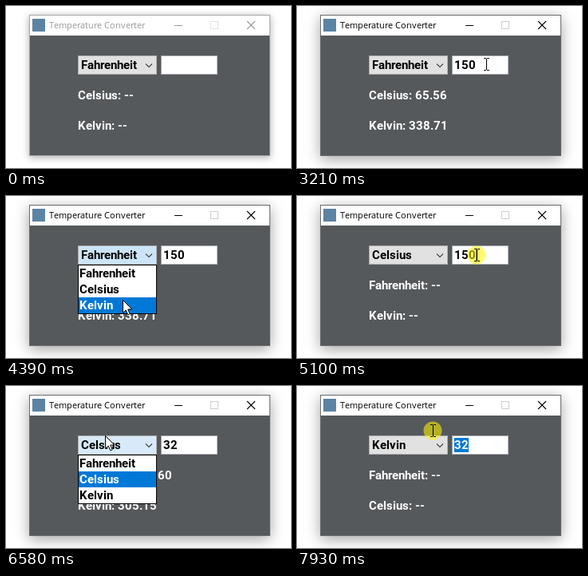
An HTML page with a canvas that plays this animation: 357 px wide and 203 px high, repeating every 8000 ms.

```html
<!DOCTYPE html>
<html lang="en">
<head>
<meta charset="utf-8">
<title>Temperature Converter</title>
<style>
html, body { margin: 0; width: 100%; height: 100%; overflow: hidden; background: #fff; }
canvas { display: block; width: 357px; height: 203px; }
</style>
</head>
<body>
<canvas id="stage" width="357" height="203"></canvas>
<script>
const ctx = document.getElementById('stage').getContext('2d');
const LOOP = 8000, START = 690, STEP = 78.65;
const BLINK = 6.5;   // half a caret period, in steps
const DIGIT = 9, FIELD_X = 197, ROW_H = 20, POPUP_Y = 87;
const BOLD = 'bold 15px Roboto, sans-serif';
const TITLE = '11px "Open Sans", sans-serif';
const BLUE = '#0078d7';
const SCALES = ['Fahrenheit', 'Celsius', 'Kelvin'];

const clamp = (v, lo, hi) => Math.min(hi, Math.max(lo, v));
const ease = u => u * u * (3 - 2 * u);

// The user's session; times are in steps after the pointer appears
const moves = [], presses = [], events = [];
const move = (from, to, x, y) => moves.push({ from, to, x, y });
const type = (at, keys, gap) =>
  [...keys].forEach((key, i) => events.push({ at: at + i * gap, kind: 'key', key }));
const enter = at => events.push({ at, kind: 'enter' });
function press(at, length) {
  presses.push({ at, end: at + length });
  events.push({ at, kind: 'down' }, { at: at + length, kind: 'up' });
}

move(0, 5, 237, 73);
press(6, 2);
type(22.6, '150', 1.45);
enter(28);
move(37, 41, 160, 64);
press(42, 1);
move(43, 47, 147, 131);
move(48, 49, 141, 121);
press(50, 1);
move(51, 53, 235, 74);
move(55, 56, 225, 74);
press(56, 2);
move(56, 58, 125, 63);
type(60.5, '32', 1);
enter(65);
press(75, 0);
move(75, 80, 142, 147);
move(80, 83, 140, 141);
press(85, 1);
move(86, 89, 235, 75);
press(90, 3);
move(90, 92, 170, 56);

function pointerAt(n) {
  let x = 244, y = 188;
  for (const m of moves) {
    const e = ease(clamp((n - m.from) / (m.to - m.from), 0, 1));
    x += (m.x - x) * e;
    y += (m.y - y) * e;
  }
  return [Math.round(x), Math.round(y)];
}

const inBox = (x, y, left, right) => x >= left && x < right && y >= 62 && y < 86;
const inCombo = (x, y) => inBox(x, y, 90, 189);
const inField = (x, y) => inBox(x, y, 194, 265);
const rowAt = y => clamp(Math.floor((y - POPUP_Y) / ROW_H), 0, 2);

// Replays the session up to step n
function stateAt(n) {
  const s = { scale: 0, value: '', selFrom: 0, open: false, openedAt: 0,
    focus: false, drag: false, solved: false, active: false, blinkFrom: 0 };
  const select = at => {
    s.selFrom = clamp(Math.round((pointerAt(at)[0] - FIELD_X) / DIGIT), 0, s.value.length);
  };
  for (const { at, kind, key } of events) {
    if (at > n) break;
    const [x, y] = pointerAt(at);
    if (kind === 'down') {
      s.active = true;
      if (inField(x, y)) {
        s.focus = s.drag = true;
        s.blinkFrom = at;
      } else if (inCombo(x, y)) {
        s.open = true;
        s.openedAt = at;
        s.focus = false;
      }
    } else if (kind === 'up') {
      if (s.drag) select(at);
      if (s.open && y >= POPUP_Y) {
        s.scale = rowAt(y);
        s.open = s.solved = false;
      }
      s.drag = false;
    } else if (kind === 'key') {
      s.value = s.value.slice(0, s.selFrom) + key;
      s.selFrom = s.value.length;
      s.blinkFrom = at;
    } else {
      s.solved = true;
    }
  }
  if (s.drag) select(n);
  s.caret = s.focus && s.selFrom === s.value.length &&
    Math.floor((n - s.blinkFrom) / BLINK) % 2 === 0;
  return s;
}

function convert(value, from, to) {
  const c = from === 0 ? (value - 32) / 1.8 : from === 1 ? value : value - 273.15;
  return (to === 0 ? c * 1.8 + 32 : to === 1 ? c : c + 273.15).toFixed(2);
}

function rect(x, y, w, h, color) {
  ctx.fillStyle = color;
  ctx.fillRect(x, y, w, h);
}

function box(x, y, w, h, fill, edge) {
  rect(x, y, w, h, edge);
  rect(x + 1, y + 1, w - 2, h - 2, fill);
}

// Desktop toolkits advance by whole pixels
function text(s, x, y, color, font = BOLD) {
  ctx.font = font;
  ctx.fillStyle = color;
  for (const ch of s) {
    ctx.fillText(ch, x, y);
    x += Math.round(ctx.measureText(ch).width);
  }
}

function trace(points) {
  ctx.beginPath();
  points.forEach(([x, y]) => ctx.lineTo(x, y));
}

function line(points, color, width = 1) {
  trace(points);
  ctx.strokeStyle = color;
  ctx.lineWidth = width;
  ctx.stroke();
}

function drawWindow(active) {
  ctx.save();
  ctx.shadowColor = active ? 'rgba(0,0,0,.36)' : 'rgba(0,0,0,.32)';
  ctx.shadowBlur = active ? 17 : 9;
  ctx.shadowOffsetY = active ? 4 : 2;
  rect(29, 11, 302, 177, active ? '#6b6d6f' : '#a4a6a7');
  ctx.restore();
  rect(30, 12, 300, 25, '#fff');
  rect(30, 37, 300, 150, '#55595c');
  rect(33, 16, 16, 16, '#5b83a3');
  const ink = active ? '#000' : '#999';
  text('Temperature Converter', 54, 28, ink, TITLE);
  rect(211, 24, 10, 1, ink);
  box(256, 19, 10, 10, '#fff', active ? '#ccc' : '#e2e2e2');
  line([[302, 19], [312, 29]], ink, 1.1);
  line([[312, 19], [302, 29]], ink, 1.1);
}

function drawCombo(scale, fill) {
  box(90, 62, 99, 24, fill, '#adadad');
  text(SCALES[scale], 94, 79, '#000');
  line([[175, 72.5], [179, 76.5], [183, 72.5]], '#444', 1.1);
}

function drawField({ value, selFrom, caret }) {
  box(194, 62, 71, 24, '#fff', '#abadb3');
  const split = FIELD_X + selFrom * DIGIT;
  rect(split, 65, (value.length - selFrom) * DIGIT, 18, BLUE);
  text(value.slice(0, selFrom), FIELD_X, 79, '#000');
  text(value.slice(selFrom), split, 79, '#fff');
  if (caret) rect(split, 65, 1, 18, '#000');
}

function drawLabels({ scale, value, solved }) {
  [0, 1, 2].filter(i => i !== scale).forEach((i, row) => {
    const result = solved ? convert(+value, scale, i) : '--';
    text(SCALES[i] + ': ' + result, 90, 117 + row * 38, '#fff');
  });
}

function drawPopup(current) {
  box(90, POPUP_Y - 1, 99, 3 * ROW_H + 2, '#fff', '#000');
  SCALES.forEach((name, i) => {
    const y = POPUP_Y + i * ROW_H;
    if (i === current) rect(91, y, 97, ROW_H, BLUE);
    text(name, 92, y + 15, i === current ? '#fff' : '#000');
  });
}

function drawArrow(x, y) {
  ctx.save();
  ctx.translate(x - 0.5, y - 0.5);
  trace([[0, 0], [0, 16], [3.7, 12.6], [6.3, 18.3], [8.7, 17.2], [6.2, 11.6], [11.3, 11.3]]);
  ctx.closePath();
  ctx.fillStyle = '#fff';
  ctx.fill();
  ctx.strokeStyle = '#000';
  ctx.lineWidth = 1;
  ctx.stroke();
  ctx.restore();
}

function drawBeam(x, y) {
  rect(x, y - 7, 1, 14, '#000');
  for (const dy of [-8, 7]) {
    rect(x - 3, y + dy, 3, 1, '#000');
    rect(x + 1, y + dy, 3, 1, '#000');
  }
}

function drawPointer(n, x, y, beam) {
  if (presses.some(p => n >= p.at && n < p.end)) {
    ctx.beginPath();
    ctx.arc(x, y, 11.5, 0, Math.PI * 2);
    ctx.fillStyle = 'rgba(255,245,0,.56)';
    ctx.fill();
  }
  (beam ? drawBeam : drawArrow)(x, y);
}

function draw(time) {
  const n = Math.floor((time - START + 10) / STEP);
  const [x, y] = pointerAt(n);
  const s = stateAt(n);

  let fill = '#e1e1e1';
  if (s.open) fill = n === s.openedAt ? '#d8eaf9' : '#cce4f7';
  else if (!s.drag && inCombo(x, y)) fill = '#e5f1fb';

  rect(0, 0, 357, 203, '#fff');
  drawWindow(s.active);
  drawCombo(s.scale, fill);
  drawField(s);
  drawLabels(s);
  if (s.open) drawPopup(y < POPUP_Y ? s.scale : rowAt(y));
  if (n >= 0) drawPointer(n, x, y, s.drag || inField(x, y));
}

const begin = performance.now();
function tick() {
  draw((performance.now() - begin) % LOOP);
  requestAnimationFrame(tick);
}
tick();
</script>
</body>
</html>
```
